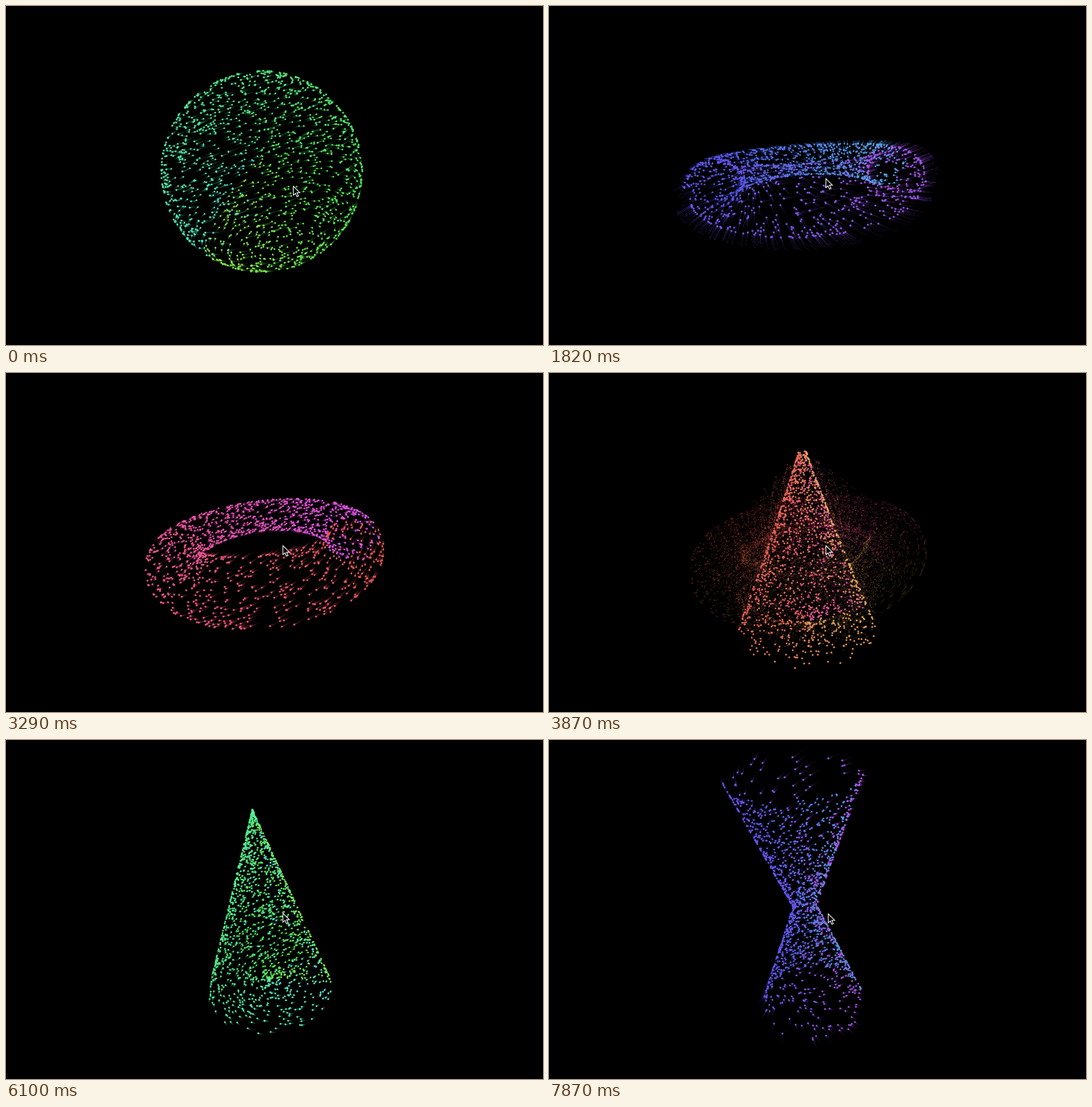
Animation of 926 by 584 pixels, one loop 8000 ms. Source, as an HTML page with a canvas:

```html
<!DOCTYPE html>
<html lang="en">
<head>
<meta charset="utf-8">
<title>Particle shapes</title>
<style>
  html, body { margin: 0; width: 100%; height: 100%; overflow: hidden; background: #000; }
  canvas { display: block; }
</style>
</head>
<body>
<canvas id="stage" width="926" height="584"></canvas>
<script>
const ctx = document.getElementById('stage').getContext('2d');
const TAU = Math.PI * 2;
const LOOP = 8000, STEP = 148;
const CENTER_X = 441, CENTER_Y = 285, FOCAL = 330;
const COUNT = 1500, TRAIL = 20, TRAIL_STEP = 1 / 60;
const SHAPE_TIME = 3, MORPH_TIME = 2, START_AGE = 2.27;

let seed = 7;
function random() {
  seed = (seed * 1664525 + 1013904223) >>> 0;
  return seed / 4294967296;
}

// Ring around the vertical axis: p = 0 is on the right, then back, left, front.
const ring = (p, radius, y) => [radius * Math.cos(p * TAU), y, -radius * Math.sin(p * TAU)];

function sphere(p, v) {
  const z = 2 * v - 1, r = 0.465 * Math.sqrt(1 - z * z), a = (p + 0.625) * TAU;
  return [r * Math.cos(a), -r * Math.sin(a), 0.465 * z];
}

function torus(p, v) {
  return ring(p, 0.43 + 0.11 * Math.cos(v * TAU), 0.11 * Math.sin(v * TAU));
}

function cone(p, v) {
  const side = 0.76, radius = 0.35, h = 0.455;
  return v < side
    ? ring(p, radius * v / side, h * (2 * v / side - 1))
    : ring(p, radius * (1 - v) / (1 - side), h);
}

function hourglass(p, v) {
  const y = 2 * v - 1;
  return ring(p, 0.06 + 0.24 * Math.abs(y), 0.56 * y);
}

// spin and tilt advance with the age of a shape, in radians per second
const shapes = [
  { form: sphere, spin: 0.4, spinStart: -0.4 * START_AGE, tilt: 0.06, tiltRate: 0.1 },
  { form: torus, spin: 0.26, spinStart: -0.3, tilt: 0.07, tiltRate: 0.125 },
  { form: cone, spin: 0.26, spinStart: -0.3, tilt: 0.07, tiltRate: 0.1 },
  { form: hourglass, spin: 0.26, spinStart: -0.3, tilt: 0.16, tiltRate: 0.1 }
];

const particles = Array.from({ length: COUNT }, () => {
  const p = random(), v = random();
  return { hue: 70 * p - 35, points: shapes.map(s => s.form(p, v)) };
});

function elasticOut(k) {
  if (k <= 0) return 0;
  return k >= 1 ? 1 : 1 + 2 ** (-10 * k) * Math.sin((10 * k - 0.75) * TAU / 3);
}

function pose(shape, age) {
  const spin = shape.spinStart + shape.spin * age;
  const tilt = shape.tilt + shape.tiltRate * age;
  return [spin, tilt, tilt * 0.32].flatMap(a => [Math.cos(a), Math.sin(a)]);
}

function rotate([x, y, z], [cs, ss, ct, st, cr, sr]) {
  const x1 = x * cs - z * ss, z1 = x * ss + z * cs;
  const y1 = y * ct + z1 * st;
  return [x1 * cr + y1 * sr, y1 * cr - x1 * sr, z1 * ct - y * st];
}

function snapshot(seconds) {
  const total = seconds + START_AGE;
  const index = Math.min(3, Math.floor(total / SHAPE_TIME));
  const age = total - index * SHAPE_TIME;
  const last = Math.max(0, index - 1);
  return {
    index, last,
    mix: index ? elasticOut(age / MORPH_TIME) : 1,
    now: pose(shapes[index], age),
    before: pose(shapes[last], age + SHAPE_TIME)
  };
}

function project(particle, s) {
  let [x, y, z] = rotate(particle.points[s.index], s.now);
  if (s.mix !== 1) {
    const from = rotate(particle.points[s.last], s.before);
    x = from[0] + (x - from[0]) * s.mix;
    y = from[1] + (y - from[1]) * s.mix;
    z = from[2] + (z - from[2]) * s.mix;
  }
  const depth = 1 - z;
  if (depth < 0.32) return null;
  return { x: CENTER_X + FOCAL * x / depth, y: CENTER_Y + FOCAL * y / depth, depth };
}

function drawParticles(seconds) {
  const trail = Array.from({ length: TRAIL }, (_, i) => snapshot(seconds - i * TRAIL_STEP));
  const baseHue = 132 + 60 * seconds;
  for (const particle of particles) {
    ctx.fillStyle = `hsl(${(baseHue + particle.hue) % 360}, 76%, 63%)`;
    for (let i = TRAIL - 1; i > 0; i--) {
      const dot = project(particle, trail[i]);
      if (!dot) continue;
      const size = 1.2 + 0.4 / dot.depth;
      ctx.globalAlpha = 0.36 * 0.86 ** i;
      ctx.fillRect(dot.x - size / 2, dot.y - size / 2, size, size);
    }
    const head = project(particle, trail[0]);
    if (!head) continue;
    ctx.globalAlpha = 0.92;
    ctx.beginPath();
    ctx.arc(head.x, head.y, 1.25 + 0.33 / head.depth, 0, TAU);
    ctx.fill();
  }
  ctx.globalAlpha = 1;
}

// time in ms, x, y
const cursorPath = [[0, 495.5, 310.5], [900, 477.5, 297.5], [5900, 477.5, 297.5],
  [6100, 477.5, 298.5], [7870, 481.5, 299.5], [8000, 481.5, 299.5]];
const arrow = new Path2D('M0 0V15.5L3.6 12.2L6.2 18L8.8 16.9L6.3 11.2H11.2Z');

function drawCursor(ms) {
  const i = cursorPath.findIndex(key => key[0] > ms);
  const a = cursorPath[i - 1], b = cursorPath[i];
  const k = (ms - a[0]) / (b[0] - a[0]);
  ctx.save();
  ctx.translate(a[1] + (b[1] - a[1]) * k, a[2] + (b[2] - a[2]) * k);
  ctx.fillStyle = '#000';
  ctx.strokeStyle = '#fff';
  ctx.lineWidth = 1.2;
  ctx.fill(arrow);
  ctx.stroke(arrow);
  ctx.restore();
}

let shown = -1;
function tick() {
  const step = Math.max(0, Math.floor((performance.now() % LOOP - 18) / STEP));
  if (step !== shown) {
    shown = step;
    const ms = step ? step * STEP + 26 : 0;
    ctx.fillStyle = '#000';
    ctx.fillRect(0, 0, 926, 584);
    drawParticles(ms / 1000);
    drawCursor(ms);
  }
  requestAnimationFrame(tick);
}
tick();
</script>
</body>
</html>
```
